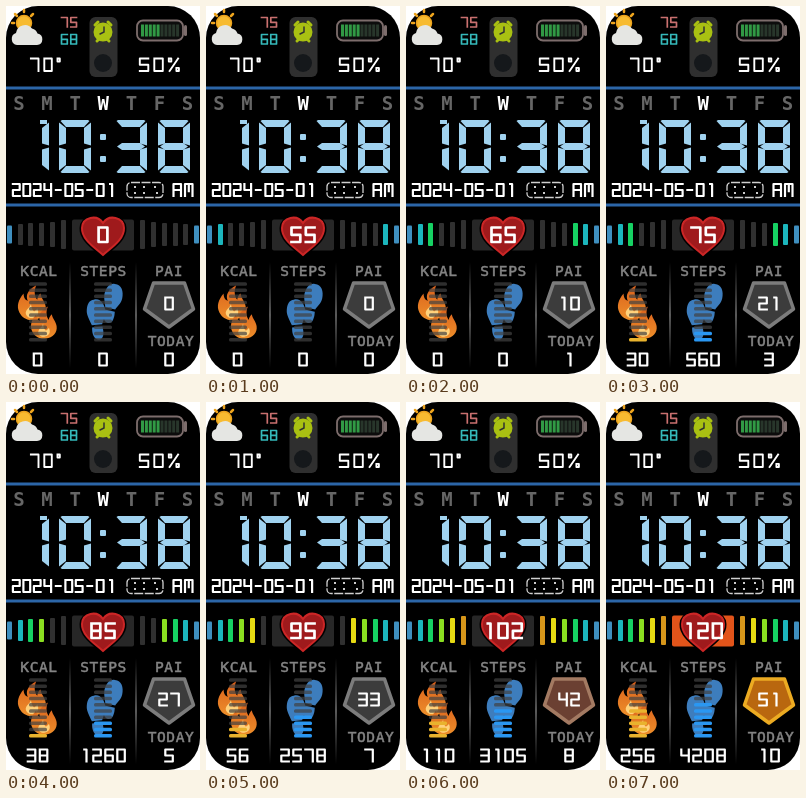
Recreate the animation shown at these times as an HTML page. Size 194 by 368 pixels, loop 8000 ms.

```html
<!DOCTYPE html>
<html lang="en">
<head>
<meta charset="utf-8">
<title>Watch face</title>
<style>
html, body { margin: 0; width: 100%; height: 100%; overflow: hidden; background: #fff; }
svg { display: block; width: 194px; height: 368px; }
text { font-family: "DejaVu Sans Mono", monospace; text-anchor: middle; }
.label { font-size: 14.5px; letter-spacing: .6px; fill: #858585; stroke: #858585; stroke-width: .5; }
.day { font-size: 19px; font-weight: bold; fill: #666; }
.today { fill: #fff; }
.line { fill: none; stroke-linejoin: round; stroke-linecap: square; }
.off { fill: #303030; }
</style>
</head>
<body>
<svg viewBox="0 0 194 368">
  <defs>
    <linearGradient id="fade" x1="0" y1="0" x2="0" y2="1">
      <stop offset="0" stop-color="#555" stop-opacity="0"/>
      <stop offset=".5" stop-color="#5a5a5a"/>
      <stop offset="1" stop-color="#555" stop-opacity="0"/>
    </linearGradient>
    <linearGradient id="fire" x1="0" y1="0" x2="0" y2="1">
      <stop offset="0" stop-color="#d9601c"/>
      <stop offset="1" stop-color="#ee8f2a"/>
    </linearGradient>
    <g id="flame">
      <path fill="url(#fire)" d="M4-17C-5-12-6-7-4-2C-7-3-8-6-8-9C-13-3-15 3-12 9C-9 15-3 17 2 16C9 15 14 10 13 3C12-2 9-4 8-9C6-7 5-5 5-3C2-7 2-12 4-17Z"/>
      <path fill="#ffd27c" d="M-1 0C-1 4-5 5-6 9C-6 13-2 15 1 14C6 13 7 9 5 5C4 7 3 7 2 8C0 6-1 3-1 0Z"/>
    </g>
    <g id="foot" fill="#3d7dbd">
      <path d="M-1-17C5-18 8-12 8-6C8-1 5 2 4 5L-5 5C-6 1-9-4-8-9C-7-14-5-17-1-17Z"/>
      <path d="M-5 7L4 7C5 13 4 18 0 18C-4 18-6 13-5 7Z"/>
    </g>
    <path id="heart" d="M97 249C88 241 75.500 233 76 222C76.500 211 91 208 97 217C103 208 117.500 211 118 222C118.500 233 106 241 97 249Z"/>
  </defs>

  <rect width="194" height="368" rx="32"/>
  <path fill="#2c66a8" d="M0 80.500h194v3H0zM0 197.500h194v3H0z"/>

  <!-- weather -->
  <g stroke="#eda41e" stroke-width="2.500" stroke-linecap="round">
    <path d="M18 4v2M9 8l2 2M27 8l-2 2M6 17h2"/>
    <circle cx="18" cy="17" r="7.500" fill="#f7bb31" stroke-width="1.500"/>
  </g>
  <path fill="#e5e6e3" d="M11 39A6.200 6.200 0 0 1 10 27A9 9 0 0 1 26 22.500A7.500 7.500 0 0 1 31.500 27.500A5.800 5.800 0 0 1 31 39Z"/>

  <!-- status -->
  <rect x="83.500" y="11" width="28" height="60" rx="6" fill="#2f2f2f"/>
  <g fill="none" stroke="#a9c012" stroke-width="3" stroke-linecap="round">
    <path d="M89 19l3-3M105 19l-3-3M92 34l-1 1M102 34l1 1"/>
    <circle cx="97" cy="26" r="8" fill="#a9c012"/>
    <path d="M98 21v5l-4 2" stroke="#303030" stroke-width="1.500"/>
  </g>
  <circle cx="97" cy="57" r="9" fill="#15181b"/>

  <!-- battery -->
  <rect x="131" y="14.500" width="46" height="20" rx="6" fill="#0c0c0c" stroke="#7d6d6c" stroke-width="1.800"/>
  <rect x="178" y="19" width="3" height="11" rx="1.500" fill="#7d6d6c"/>
  <g id="battery"></g>

  <g id="days"></g>
  <g id="clock" fill="#a0d2ef"></g>
  <rect x="121" y="176.500" width="36" height="15" rx="4" fill="none" stroke="#d0d0d0" stroke-width="1.300" stroke-dasharray="9 1.500"/>
  <path d="M128 181h2M128 187h2M137 181h2M137 187h2M148 181h2M150 187h2" stroke="#ccc" stroke-width="1.800"/>

  <!-- heart rate -->
  <g id="bars"></g>
  <rect id="zone" x="66" y="213.500" width="62" height="31" rx="2"/>
  <use href="#heart" stroke="#000" stroke-width="5"/>
  <use href="#heart" fill="#9f1a1c" stroke="#cc2626" stroke-width="2"/>

  <!-- activity -->
  <text class="label" x="33" y="269.500">KCAL</text>
  <text class="label" x="97.500" y="269.500">STEPS</text>
  <text class="label" x="163" y="269.500">PAI</text>
  <text class="label" x="165" y="340">TODAY</text>
  <path fill="url(#fade)" d="M63 256h2v106h-2zM129 256h2v106h-2z"/>
  <use href="#flame" transform="translate(26 297) scale(1.05)"/>
  <use href="#flame" transform="translate(38 317) scale(.97)"/>
  <use href="#foot" transform="translate(106 297) rotate(12) scale(1.13)"/>
  <use href="#foot" transform="translate(91 313) rotate(-6) scale(1.15)"/>
  <g id="stacks"></g>
  <path id="badge" stroke-width="3.500" stroke-linejoin="round" d="M147.500 277H178.500L187.500 303L163 321L138.500 303Z"/>

  <g id="fixed"></g>
  <g id="values"></g>
</svg>

<script>
const $ = id => document.getElementById(id);

// Glyph strokes on a unit cell
const points = { a: [0, 0], b: [1, 0], c: [0, .5], d: [1, .5], e: [0, 1], f: [1, 1],
  g: [.4, 0], h: [.7, 0], i: [.7, 1], j: [.15, .5], k: [.85, .5], m: [.5, 0], n: [.5, .6],
  p: [.3, 0], q: [.3, .25], r: [0, .25], s: [.9, .75], t: [1.2, .75], u: [1.2, 1], v: [.9, 1], w: [1.1, 0], x: [.1, 1] };
const glyphs = { 0: 'abfea', 1: 'ghi', 2: 'abdcef', 3: 'abfe cd', 4: 'acd bf', 5: 'bacdfe',
  6: 'baefdc', 7: 'abf', 8: 'abfea cd', 9: 'dcabfe', '-': 'jk', '%': 'apqra stuvs xw', '°': 'apqra',
  A: 'eabf cd', M: 'eabf mn' };

function digits(str, cx, y, size = {}) {
  const { w = 7.5, h = 12, pitch = 12, weight = 2.2, color = '#fff' } = size;
  const left = cx - (pitch * (str.length - 1) + w) / 2;
  let d = '';
  [...str].forEach((ch, n) => {
    for (const run of glyphs[ch].split(' ')) {
      d += 'M' + [...run].map(k => {
        const [px, py] = points[k];
        return (left + n * pitch + px * w).toFixed(1) + ' ' + (y + py * h).toFixed(1);
      }).join('L');
    }
  });
  return `<path class="line" d="${d}" stroke="${color}" stroke-width="${weight}"/>`;
}

const rect = (x, y, w, h, attrs) => `<rect x="${x}" y="${y}" width="${w}" height="${h}" ${attrs}/>`;

// Bevelled segments of the large clock
const W = 32, H = 53, T = 7, M = H / 2;
const segments = [
  [3, 0, W - 3, 0, W - 1.5, 1, W - T, T, T, T, 1.5, 1],
  [W, 2.5, W, M - 1, W - T, M - 3, W - T, T + 1],
  [W, M + 1, W, H - 2.5, W - T, H - T - 1, W - T, M + 3],
  [3, H, W - 3, H, W - 1.5, H - 1, W - T, H - T, T, H - T, 1.5, H - 1],
  [0, M + 1, 0, H - 2.5, T, H - T - 1, T, M + 3],
  [0, 2.5, 0, M - 1, T, M - 3, T, T + 1],
  [2, M, T, M - 3.5, W - T, M - 3.5, W - 2, M, W - T, M + 3.5, T, M + 3.5]
];
const bigDigit = (x, on) => `<g transform="translate(${x} 114)">` +
  on.map(n => `<polygon points="${segments[n]}"/>`).join('') + '</g>';

$('clock').innerHTML = bigDigit(11, [1, 2]) + rect(34, 114, 7, 4, '') +
  bigDigit(53, [0, 1, 2, 3, 4, 5]) +
  rect(94, 128, 6, 6, 'rx="1"') + rect(94, 150, 6, 6, 'rx="1"') +
  bigDigit(109, [0, 1, 2, 3, 6]) + bigDigit(152, [0, 1, 2, 3, 4, 5, 6]);

$('days').innerHTML = [...'SMTWTFS'].map((day, n) =>
  `<text class="day ${n === 3 ? 'today' : ''}" x="${13 + n * 28.1}" y="104">${day}</text>`).join('');

$('battery').innerHTML = Array.from({ length: 10 }, (_, n) =>
  rect(135 + n * 3.9, 18.5, 3, 12, `fill="${n < 5 ? '#319a45' : '#28362b'}"`)).join('');

const small = { w: 5.8, h: 9.5, pitch: 9.3, weight: 1.7 };
$('fixed').innerHTML =
  digits('75', 63, 11.5, { ...small, color: '#c9706f' }) +
  digits('68', 63, 28.5, { ...small, color: '#35b9ba' }) +
  digits('70°', 42, 52.5, { pitch: 13.3, h: 12.5, weight: 1.9 }) +
  digits('50%', 152.5, 52.5, { pitch: 14.5, w: 8.5, h: 12.5, weight: 1.9 }) +
  digits('2024-05-01', 57.5, 178, { w: 6.8, h: 12, pitch: 10.5 }) +
  digits('AM', 177, 178, { w: 7.5, pitch: 11.5 });

// One entry per second
const states = {
  pulse: [0, 55, 65, 75, 85, 95, 102, 120],
  kcal:  [0, 0, 0, 30, 38, 56, 110, 256],
  steps: [0, 0, 0, 560, 1260, 2578, 3105, 4208],
  pai:   [0, 0, 10, 21, 27, 33, 42, 51],
  gain:  [0, 0, 1, 3, 5, 7, 8, 10],
  bars:  [1, 2, 3, 3, 4, 5, 6, 6],
  fire:  [0, 0, 0, 1, 1, 2, 3, 5],
  walk:  [0, 0, 0, 2, 3, 4, 5, 6]
};
const barColors = ['#3f8fbf', '#1cb6bd', '#16d163', '#8ade20', '#e6da12', '#d6961a'];
const barStarts = [1, 12, 22, 33, 44, 55];
const barTops = [219.5, 218, 217, 217, 216, 214];

function drawBars(lit) {
  return barStarts.map((x, n) => {
    const y = barTops[n], h = 2 * (228.5 - y);
    const look = n < lit ? `rx="1" fill="${barColors[n]}"` : 'rx="1" class="off"';
    return rect(x, y, 5, h, look) + rect(189 - x, y, 5, h, look);
  }).join('');
}

function drawStack(x, lit, color) {
  return Array.from({ length: 10 }, (_, n) =>
    rect(x, 332 - n * 6.2, 18, 3.5, n < lit
      ? `rx="1.5" fill="${color}"`
      : 'rx="1.5" fill="#424242" fill-opacity=".7"')).join('');
}

function badgeColors(pai) {
  if (pai > 50) return ['#b9670f', '#ecab22'];
  if (pai > 40) return ['#6b4032', '#a37a62'];
  return ['#3c3c3c', '#7c7c7c'];
}

function draw(step) {
  const now = key => states[key][step];
  const [fill, edge] = badgeColors(now('pai'));
  $('bars').innerHTML = drawBars(now('bars'));
  $('zone').setAttribute('fill', now('pulse') > 110 ? '#e2541a' : '#272727');
  $('stacks').innerHTML = drawStack(23, now('fire'), '#e9b32e') + drawStack(88, now('walk'), '#2a97f2');
  $('badge').setAttribute('fill', fill);
  $('badge').setAttribute('stroke', edge);
  $('values').innerHTML =
    digits(String(now('pulse')), 97, 221.5, { w: 8.8, h: 14.5, pitch: 14.3, weight: 2.7 }) +
    digits(String(now('kcal')), 31.5, 347.5) +
    digits(String(now('steps')), 97, 347.5) +
    digits(String(now('pai')), 163, 291.5) +
    digits(String(now('gain')), 163, 347.5);
}

let shown = -1;
const start = performance.now();
function tick() {
  const step = Math.floor((performance.now() - start) / 1000) % 8;
  if (step !== shown) draw(shown = step);
  requestAnimationFrame(tick);
}
tick();
</script>
</body>
</html>
```
